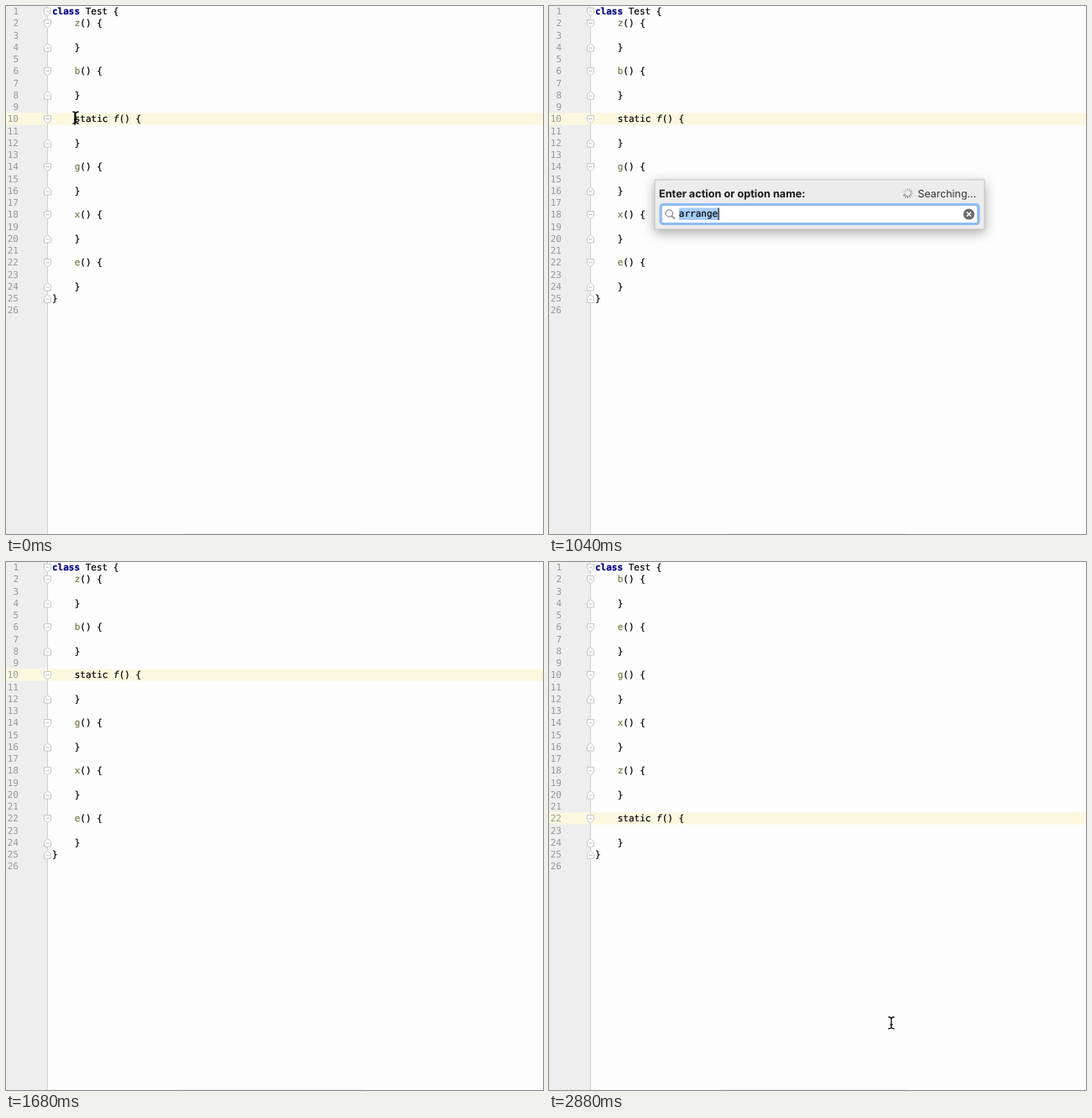
These frames come from a looping animation (640 by 629 pixels, 2960 ms). An HTML page:

```html
<!DOCTYPE html>
<html lang="en">
<head>
<meta charset="utf-8">
<title>Rearrange code</title>
<style>
  html, body { margin: 0; width: 100%; height: 100%; overflow: hidden; background: #fdfdfd; }
  svg { display: block; width: 100%; height: 100%; }
  text { white-space: pre; text-rendering: geometricPrecision; }
  .mono { font: 11px "DejaVu Sans Mono", monospace; }
  .code { stroke: #000; stroke-width: 0.2px; }
  .ui { font: 12.4px Inter, "DejaVu Sans", sans-serif; }
  .title { font-size: 12.7px; font-weight: 700; }
  .key { font-size: 10.8px; font-weight: 700; }
  .foot { font-size: 10.45px; }
  .num { text-anchor: end; }
  .kw { fill: #000080; stroke: #000080; font-weight: bold; }
  .name { fill: #7a7a43; stroke: #7a7a43; }
  .static { font-style: italic; }
  .fold { fill: #fdfdfd; stroke: #c6c6c6; stroke-width: 1; }
  .end { text-anchor: end; }
</style>
</head>
<body>
<svg id="stage" viewBox="0 0 640 629" preserveAspectRatio="none"></svg>
<script>
const LOOP = 2960, STEP = 80;
const ROW = 14.25, ITEM = 22.8;
const svg = document.getElementById('stage');

function add(parent, tag, attrs = {}, text) {
  const el = document.createElementNS('http://www.w3.org/2000/svg', tag);
  for (const k in attrs) el.setAttribute(k, attrs[k]);
  if (text !== undefined) el.textContent = text;
  parent.appendChild(el);
  return el;
}
const group = (parent, attrs) => add(parent, 'g', attrs);
const rect = (parent, x, y, width, height, fill, more) =>
  add(parent, 'rect', { x, y, width, height, fill, ...more });
const path = (parent, d, stroke, width = 1, fill = 'none') =>
  add(parent, 'path', { d, stroke, 'stroke-width': width, fill });
const label = (parent, x, y, text, cls, fill = '#000') =>
  add(parent, 'text', { x, y, class: cls, fill }, text);
const show = (el, on) => el.setAttribute('visibility', on ? 'inherit' : 'hidden');
const rowTop = line => -0.9 + ROW * (line - 1);
const baseline = line => 10.1 + ROW * (line - 1);

// Editor
rect(svg, 0, 0, 640, 629, '#fdfdfd');
rect(svg, 0, 0, 49, 629, '#eeeeee');
rect(svg, 212, 627.5, 216, 1.5, '#f7f7f7');
const current = rect(svg, 0, 0, 640, ROW, '#fcf8e0');
rect(svg, 49, 0, 1, 629, '#d2d2d2');

function fold(line, closing) {
  const flip = closing ? -1 : 1;
  const g = group(svg, { transform: `translate(49.5 ${rowTop(line) + 7.7}) scale(1 ${flip})` });
  add(g, 'path', { class: 'fold', d: 'M-4 -4.5H4V1.5L0 5L-4 1.5Z' });
  path(g, 'M-2 -0.5H2', '#bdbdbd');
}
for (let i = 1; i <= 26; i++) label(svg, 15, baseline(i), i, 'mono num', '#999');
fold(1);
for (let i = 2; i <= 22; i += 4) { fold(i); fold(i + 2, true); }
fold(25, true);

function code(order) {
  const g = group(svg, { class: 'mono code' });
  const head = label(g, 55, baseline(1), '');
  add(head, 'tspan', { class: 'kw' }, 'class');
  add(head, 'tspan', {}, ' Test {');
  [...order].forEach((name, i) => {
    const line = 2 + i * 4, fixed = name === 'f';
    const t = label(g, 81.7, baseline(line), '');
    if (fixed) add(t, 'tspan', {}, 'static ');
    add(t, 'tspan', { class: fixed ? 'static' : 'name' }, name);
    add(t, 'tspan', {}, '() {');
    label(g, 81.7, baseline(line + 2), '}');
  });
  label(g, 55, baseline(25), '}');
  return g;
}
const before = code('zbfgxe');
const after = code('begxzf');
const caret = rect(svg, 81.3, 0, 1.7, ROW, '#000');

// Popup
const popup = group(svg, { class: 'ui' });
const frame = rect(popup, 126, 207, 393, 59, '#ececec',
  { stroke: '#bcbcbc', 'stroke-width': 0.8, style: 'filter:drop-shadow(0 4px 7px rgba(0,0,0,.33))' });
label(popup, 131, 228, 'Enter action or option name:', 'title', '#1a1a1a');

const searching = group(popup);
label(searching, 439.5, 228, 'Searching...', '', '#333');
const spokes = Array.from({ length: 12 }, (_, i) =>
  add(searching, 'path', { d: 'M0 -3V-6', stroke: '#555', 'stroke-width': 1,
    transform: `translate(427.5 223) rotate(${i * 30})` }));

rect(popup, 134.5, 237.5, 376, 21, '#fff', { rx: 2, stroke: '#cdcdcd' });
const ring = rect(popup, 133, 236.5, 379, 23, 'none',
  { rx: 3, stroke: '#8dbcf3', 'stroke-width': 3 });
const selection = rect(popup, 155, 240.5, 47, 14.5, '#a5cdfd');
add(popup, 'circle', { cx: 143.3, cy: 247, r: 4.2, fill: 'none', stroke: '#6e6e6e' });
path(popup, 'M146.3 250L150 253.8', '#6e6e6e', 1.2);
label(popup, 154.8, 251.3, 'arrange', 'mono code');
const fieldCaret = rect(popup, 201.6, 240.5, 1.1, 14.5, '#000');
add(popup, 'circle', { cx: 500.4, cy: 248, r: 6.6, fill: '#6c6c6c' });
path(popup, 'M497.9 245.5l5 5m0 -5l-5 5', '#fff', 1.5);

// Results
const list = group(popup);
rect(list, 126, 266, 393, 320, '#fdfdfd');
rect(list, 126, 266, 379, 23, '#0f57d1');
rect(list, 126, 289, 379, 23, '#f5f5f5');
rect(list, 505, 266, 14, 320, '#f8f8f8');
rect(list, 508, 269, 8, 274, '#c1c1c1', { rx: 4 });
rect(list, 126, 585, 393, 1, '#c4c4c4');

const icons = {
  plus: g => path(g, 'M-5 0H5M0 -5V5', '#5e5e5e', 1.8),
  section(g) {
    path(g, 'M-6.5 -1.5H3M-1.8 -6V3.2', '#5e5e5e', 1.8);
    add(g, 'text', { x: 0.8, y: 6.5, class: 'key', fill: '#5e5e5e' }, 's');
  },
  gear(g) {
    for (let a = 0; a < 360; a += 45)
      rect(g, -1.4, -6.6, 2.8, 4, '#4596cb', { transform: `rotate(${a})` });
    add(g, 'circle', { r: 3.6, fill: 'none', stroke: '#4596cb', 'stroke-width': 2.8 });
  },
  pencil: g => path(g, 'M-5.5 5.5L-4.5 1.8L2.5 -5.2L5.2 -2.5L-1.8 4.5Z', 'none', 0, '#686868'),
  down: g => path(g, 'M-5 -2.8H5L0 3.2Z', 'none', 0, '#505050'),
  up: g => path(g, 'M-5 2.8H5L0 -3.2Z', 'none', 0, '#505050')
};
const itemBase = i => 282.1 + ITEM * i;

rect(list, 162, 270, 45, 16, '#b9a45e', { rx: 2 });
label(list, 148, itemBase(0), 'Re', '', '#fff');
label(list, 162.6, itemBase(0), 'arrange', '', '#514a30');
label(list, 210.6, itemBase(0), 'Code', '', '#fff');
label(list, 501.5, itemBase(0), 'Code Formatting Actions', 'end', '#fff');
label(list, 148, itemBase(1), 'Arrangement', '', '#1a1a1a');
label(list, 501.5, itemBase(1), 'Preferences > XML', 'end', '#858585');

const addRule = ['plus', 'Add rule', '⌘N'];
const editRule = ['pencil', 'Edit rule', 'F2'];
const moveDown = ['down', 'Move down', '⌥↓'];
const moveUp = ['up', 'Move up', '⌥↑'];
[
  addRule, addRule, ['section', 'Add section rule'],
  ['gear', 'Configure matching rules aliases'],
  editRule, editRule, moveDown, moveDown, moveDown, moveUp, moveUp, moveUp
].forEach(([icon, text, key], n) => {
  const i = n + 2;
  icons[icon](group(list, { transform: `translate(137 ${277.6 + ITEM * i})` }));
  const t = label(list, 148, itemBase(i), '', '', icon === 'gear' ? '#1a1a1a' : '#999');
  add(t, 'tspan', {}, text);
  if (key) add(t, 'tspan', { class: 'key', dx: 3 }, key);
});

const foot = (x, text) => label(list, x, 597.5, text, 'foot', '#1a1a1a');
foot(131, 'Press');
foot(182, 'or');
foot(215.8, 'to navigate through the history');
for (const [x, dir] of [[165.5, 1], [199.5, -1]]) {
  path(list, `M${x - 3} 594l3 -3.5l3 3.5`, '#1a1a1a', 1.1);
  const g = group(list, { transform: `translate(${x + 9} 594) scale(1 ${dir})` });
  path(g, 'M0 4V-3.6M-3 -0.8L0 -3.8L3 -0.8', '#1a1a1a', 1.2);
}

// Mouse pointer
const pointer = group(svg);
const beam = 'M-3.6 -7Q-0.6 -7 0 -5Q0.6 -7 3.6 -7M-3.6 7Q-0.6 7 0 5Q0.6 7 3.6 7M0 -5V5M-1.8 2.2H1.8';
path(pointer, beam, '#111', 1.3);

const within = (t, a, b) => t >= a && t < b;
const mix = (a, b, p) => a + (b - a) * p;
const ease = p => p * p * (3 - 2 * p);

function pointerAt(t) {
  if (t < 320) {
    const p = ease(t / 320);
    return [mix(83, 408, p), mix(133, 549, p)];
  }
  const p = ease(Math.min(1, Math.max(0, (t - 2720) / 160)));
  return [mix(400, 408, p), mix(528, 549, p)];
}

function draw(ms) {
  const t = Math.floor((ms % LOOP) / STEP) * STEP;
  const sorted = t >= 1840;
  const line = sorted ? 22 : 10;
  show(before, !sorted);
  show(after, sorted);
  current.setAttribute('y', rowTop(line));
  caret.setAttribute('y', rowTop(line));
  show(caret, t < 480 || within(t, 2160, 2640));

  const results = t >= 1120, focused = t >= 880;
  show(popup, within(t, 720, 1680));
  frame.setAttribute('height', results ? 394.5 : 59);
  show(list, results);
  show(ring, focused);
  show(selection, focused);
  show(fieldCaret, within(t, 880, 1280));
  show(searching, within(t, 960, 1120));
  spokes.forEach((s, i) =>
    s.setAttribute('opacity', 0.2 + 0.75 * ((i + 136 - t / STEP) % 12) / 12));

  show(pointer, t < 320 || t >= 2720);
  pointer.setAttribute('transform', `translate(${pointerAt(t)})`);
}

const start = performance.now();
function tick() {
  draw(performance.now() - start);
  requestAnimationFrame(tick);
}
tick();
</script>
</body>
</html>
```
